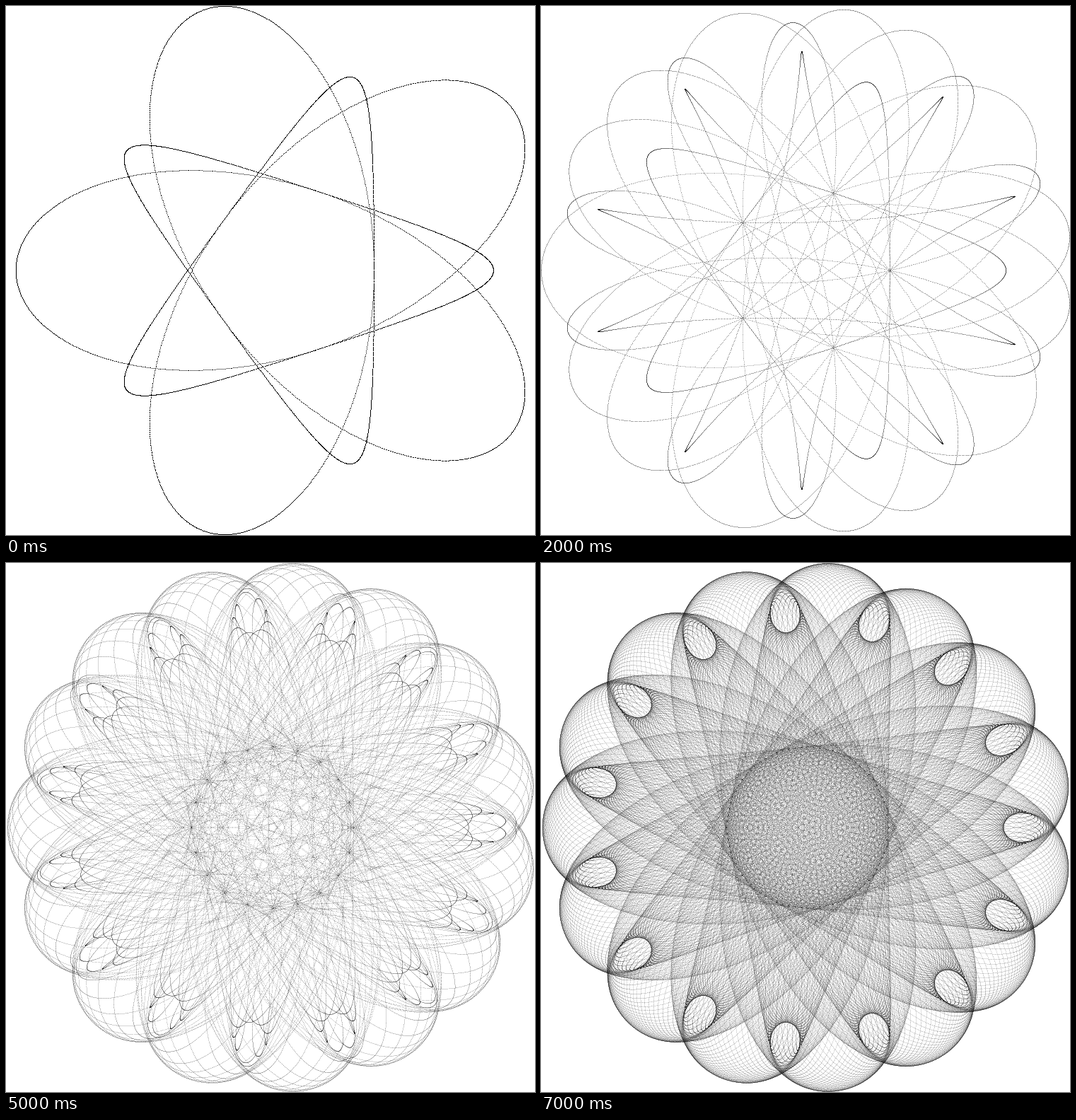
Write an HTML page with a canvas that moves like this. It is 748x748 px and loops after 8000 ms.

```html
<!DOCTYPE html>
<html>
<head>
<meta charset="utf-8">
<style>
html, body { margin: 0; overflow: hidden; background: #fff; }
canvas { display: block; }
</style>
</head>
<body>
<canvas id="stage" width="748" height="748"></canvas>
<script>
const SIZE = 748, STEPS = 8, STEP_MS = 1000, DOTS = 3200, TAU = 2 * Math.PI;
const ctx = document.getElementById('stage').getContext('2d');

// Dotted five-fold curves; every step doubles how many of them wind around the torus.
function curvePoints(step) {
  const curves = 2 ** (step + 1);
  const xs = new Float64Array(curves * DOTS), ys = new Float64Array(curves * DOTS);
  for (let d = 0, i = 0; d < DOTS; d++) {
    const t = TAU * d / DOTS;
    const c2 = Math.cos(2 * t), s2 = Math.sin(2 * t);
    const c3 = Math.cos(3 * t), s3 = Math.sin(3 * t);
    // z = u * e^(ia) + v * e^(16ia)
    const ux = c2 - c3, uy = s2 + s3;
    const vx = 0.2 * c2 + 0.5 * c3, vy = 0.2 * s2 - 0.5 * s3;
    for (let c = 0; c < curves; c++, i++) {
      const a = TAU * c / curves;
      const ca = Math.cos(a), sa = Math.sin(a);
      const cg = Math.cos(16 * a), sg = Math.sin(16 * a);
      xs[i] = ux * ca - uy * sa + vx * cg - vy * sg;
      ys[i] = ux * sa + uy * ca + vx * sg + vy * cg;
    }
  }
  return [xs, ys];
}

function range(values) {
  let lo = Infinity, hi = -Infinity;
  for (const v of values) {
    if (v < lo) lo = v;
    if (v > hi) hi = v;
  }
  return { mid: (lo + hi) / 2, span: hi - lo };
}

// Translucent dots that darken where they overlap.
function render(step) {
  const [xs, ys] = curvePoints(step);
  const rx = range(xs), ry = range(ys);
  const half = (SIZE - 1) / 2;
  const scale = (SIZE - 1) / Math.max(rx.span, ry.span);
  const keep = 1 - 1 / (1 + step);
  const light = new Float32Array(SIZE * SIZE).fill(1);
  for (let i = 0; i < xs.length; i++) {
    const x = Math.round(half + (xs[i] - rx.mid) * scale);
    const y = Math.round(half - (ys[i] - ry.mid) * scale);
    light[y * SIZE + x] *= keep;
  }
  const image = ctx.createImageData(SIZE, SIZE);
  light.forEach((v, i) => image.data.set([255 * v, 255 * v, 255 * v, 255], 4 * i));
  return image;
}

const images = Array.from({ length: STEPS }, (_, step) => render(step));
const start = performance.now();
function tick() {
  const step = Math.floor((performance.now() - start) / STEP_MS) % STEPS;
  ctx.putImageData(images[step], 0, 0);
  requestAnimationFrame(tick);
}
tick();
</script>
</body>
</html>
```
